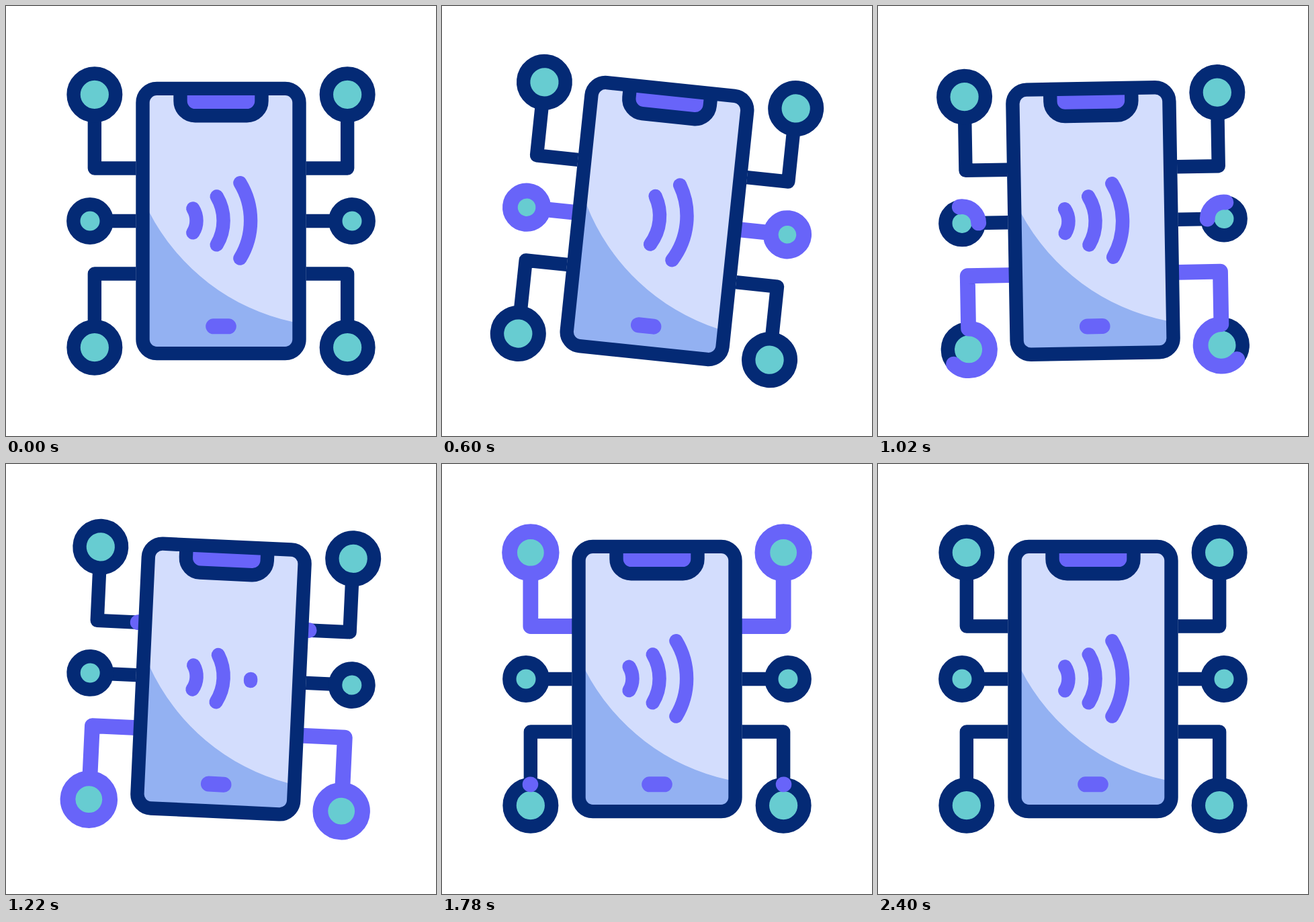
These frames come from a looping animation (640x640 px, 2.52 s). An HTML page:

```html
<!DOCTYPE html>
<html lang="en">
<head>
<meta charset="utf-8">
<title>Connected phone</title>
<style>
  html, body { margin: 0; width: 100%; height: 100%; overflow: hidden; background: #fff; }
  svg { display: block; width: 100vw; height: 100vh; }
  path, rect, circle { stroke-width: 20.4; stroke-linejoin: round; }
  .navy { stroke: #042a75; }
  .none { fill: none; }
  .teal { fill: #67ccd1; }
  .violet { fill: #6864f9; }
  .pulse, .wave { fill: none; stroke: #6864f9; stroke-linecap: round; }
  .pulse { stroke-width: 22.8; }
</style>
</head>
<body>
<svg viewBox="0 0 640 640">
  <g id="icon">
    <g id="nodes"></g>
    <rect x="203.5" y="122.9" width="233" height="394.2" rx="21" fill="#d3ddfd"/>
    <path d="M213 306.5A315.7 315.7 0 0 0 427 470.3V510H213Z" fill="#93b1f2"/>
    <path class="navy violet" d="M259.5 123V141.3A22 22 0 0 0 281.5 163.3H358.5A22 22 0 0 0 380.5 141.3V123"/>
    <rect class="navy none" x="203.5" y="122.9" width="233" height="394.2" rx="21"/>
    <rect class="violet" x="297.2" y="465.3" width="45.6" height="23" rx="11.5"/>
    <g id="waves"></g>
  </g>
</svg>
<script>
const LOOP = 2520, STEP = 20;
const NS = 'http://www.w3.org/2000/svg';
const icon = document.getElementById('icon');
const nodes = document.getElementById('nodes');
const waves = document.getElementById('waves');

function add(parent, tag, attrs) {
  const el = document.createElementNS(NS, tag);
  for (const k in attrs) el.setAttribute(k, attrs[k]);
  return parent.appendChild(el);
}

// Smooth 0..1 progress of t between a and b
function ease(t, a, b) {
  const p = Math.min(1, Math.max(0, (t - a) / (b - a)));
  return p * p * (3 - 2 * p);
}

// Show only the part of a path between two fractions of its length
function trim({ el, len }, from, to) {
  const size = (to - from) * len;
  el.style.display = size < 0.01 ? 'none' : '';
  el.setAttribute('stroke-dasharray', `${size} ${len * 2}`);
  el.setAttribute('stroke-dashoffset', -from * len);
}

const measured = el => ({ el, len: el.getTotalLength() });

// Ring centre and radius, the wire leading to it, and the pulse start time
const wires = [
  { x: 125, y: 320, r: 24.7, wire: 'M193.5 320H149.7', dx: 1, dy: 0, start: 0 },
  { x: 131.85, y: 508.15, r: 31.3, wire: 'M193.5 398.5H131.85V476.85', dx: 0, dy: -1, start: 600 },
  { x: 131.85, y: 131.85, r: 31.3, wire: 'M193.5 241.5H131.85V163.15', dx: 0, dy: 1, start: 1200 }
];

const pulses = [];
for (const side of ['', 'translate(640 0) scale(-1 1)']) {
  const g = add(nodes, 'g', { transform: side });
  for (const { x, y, r, wire, dx, dy, start } of wires) {
    const half = s => `A${r} ${r} 0 0 1 ${x + s * dx * r} ${y + s * dy * r}`;
    const d = wire + half(-1) + half(1);
    add(g, 'path', { class: 'navy none', d: wire });
    add(g, 'circle', { class: 'navy teal', cx: x, cy: y, r });
    pulses.push({ ...measured(add(g, 'path', { class: 'pulse', d })), start });
  }
}

// x of the ends, half height, radius, start of the first dip
const arcs = [
  [278.3, 18, 33.8, 400],
  [313.7, 36, 70.4, 200],
  [348.4, 56.2, 108.4, 0]
].map(([x, h, r, start]) => {
  const d = `M${x} ${319.4 - h}A${r} ${r} 0 0 1 ${x} ${319.4 + h}`;
  return { ...measured(add(waves, 'path', { class: 'wave', d })), start };
});

const swing = [[90, 0], [510, 8], [870, -5], [1170, 3], [1410, 0]];

function angle(t) {
  let a = 0;
  for (let i = 1; i < swing.length; i++) {
    const [t0, a0] = swing[i - 1], [t1, a1] = swing[i];
    a += (a1 - a0) * ease(t, t0, t1);
  }
  return a;
}

function dip(t, s) {
  return 1 - ease(t, s, s + 200) + ease(t, s + 200, s + 400);
}

function draw(t) {
  icon.setAttribute('transform', `rotate(${angle(t)} 320 320)`);
  for (const p of pulses) {
    trim(p, ease(t, p.start + 600, p.start + 1200), ease(t, p.start, p.start + 600));
  }
  for (const a of arcs) {
    const k = Math.min(dip(t, a.start), dip(t, a.start + 1000));
    trim(a, (1 - k) / 2, (1 + k) / 2);
  }
}

const begin = performance.now();
function tick() {
  const t = (performance.now() - begin) % LOOP;
  draw(Math.floor(t / STEP) * STEP);
  requestAnimationFrame(tick);
}
draw(0);
requestAnimationFrame(tick);
</script>
</body>
</html>
```
